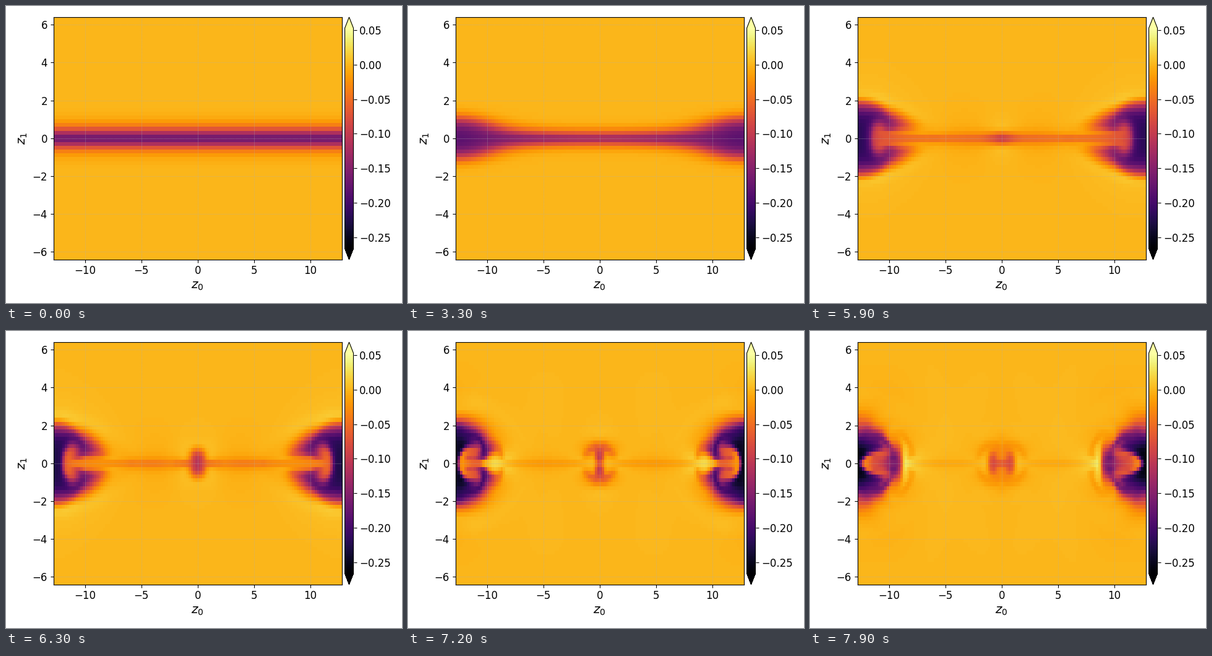
A matplotlib script for the animation above (8 s loop, 640x480 px).

```python
"""Two-fluid magnetic reconnection: ion momentum out of the plane."""
import numpy as np
import matplotlib.pyplot as plt
from matplotlib.animation import FuncAnimation
from mpl_toolkits.axes_grid1 import make_axes_locatable

FRAMES, INTERVAL = 80, 100
LX, LY, NX, NY = 25.6, 12.8, 128, 64
H = LX / NX
DT = 0.9 * H                      # light speed is 1
GAMMA = 5 / 3
B0, LAM, NB, PSI0 = 0.1, 0.5, 0.2, 0.01
MASS = np.array([1 / 25, 1.0]).reshape(2, 1, 1)
CHARGE = np.array([-1.0, 1.0]).reshape(2, 1, 1)
SHARE = np.array([1 / 6, 5 / 6]).reshape(2, 1, 1)
QM = CHARGE / MASS
RHO_MIN, P_MIN = 0.005 * MASS, 1e-6
MARK_FRAME, MARK_VALUE = 51, -0.075   # X-line value that sets the clock
EVERY, MAX_STEPS = 4, 2400


def initial():
    """Perturbed current sheet on one quarter of the box."""
    x = (np.arange(NX // 2) + 0.5) * H
    y = (np.arange(NY // 2) + 0.5)[:, None] * H
    sech2 = 1 / np.cosh(y / LAM) ** 2 + 0 * x
    n = sech2 + NB
    fluid = np.zeros((5, 2) + n.shape)
    fluid[0] = MASS * n
    fluid[3] = -SHARE * B0 / LAM * sech2 / QM
    p = SHARE * n * B0 ** 2 / 2
    fluid[4] = p / (GAMMA - 1) + fluid[3] ** 2 / fluid[0] / 2
    kx, ky = 2 * np.pi / LX, np.pi / LY
    field = np.zeros((7,) + n.shape)      # Ex Ey Ez Bx By Bz psi
    field[3] = B0 * np.tanh(y / LAM) - PSI0 * ky * np.cos(kx * x) * np.sin(ky * y)
    field[4] = PSI0 * kx * np.sin(kx * x) * np.cos(ky * y)
    return fluid, field


def slope(a):
    """Monotonized-centred differences along the last axis."""
    d = np.diff(a)
    l, r = d[..., :-1], d[..., 1:]
    m = np.minimum(2 * np.minimum(abs(l), abs(r)), abs(l + r) / 2)
    return np.where(l * r > 0, np.copysign(m, l), 0)


def kinetic(u):
    return (u[1] ** 2 + u[2] ** 2 + u[3] ** 2) / u[0] / 2


def primitive(u):
    w = u / u[0]
    w[0] = u[0]
    w[4] = (GAMMA - 1) * (u[4] - kinetic(u))
    return w


def hllc(L, R):
    cl, cr = (np.sqrt(GAMMA * w[4] / w[0]) for w in (L, R))
    sl = np.minimum(L[1] - cl, R[1] - cr)
    sr = np.maximum(L[1] + cl, R[1] + cr)
    ml, mr = L[0] * (sl - L[1]), R[0] * (sr - R[1])
    sm = (R[4] - L[4] + ml * L[1] - mr * R[1]) / (ml - mr)
    left = sm > 0
    r, u, v, w, p = np.where(left, L, R)
    s = np.where(left, sl, sr)
    e = p / (GAMMA - 1) + r * (u * u + v * v + w * w) / 2
    k = (s - u) / (s - sm)
    rk = r * k
    state = np.array([r, r * u, r * v, r * w, e])
    star = np.array([rk, rk * sm, rk * v, rk * w,
                     k * (e + (sm - u) * (r * sm + p / (s - u)))])
    flux = u * state
    flux[1] += p
    flux[4] += p * u
    return flux + np.where(left, np.minimum(s, 0), np.maximum(s, 0)) * (star - state)


def sweep_fluid(fluid, axis):
    view = fluid if axis == 0 else fluid.swapaxes(2, 3)
    order = [0, 1, 2, 3, 4] if axis == 0 else [0, 2, 1, 3, 4]
    u = view[order]
    w = primitive(u)
    w = np.concatenate([w[..., 1::-1], w, w[..., :-3:-1]], -1)
    w[1, ..., :2] *= -1
    w[1, ..., -2:] *= -1
    d = slope(w)
    c = w[..., 1:-1]
    change = c[1] * d
    change[0] += c[0] * d[1]
    change[1] += d[4] / c[0]
    change[4] += GAMMA * c[4] * d[1]
    mid = c - DT / H / 2 * change
    L, R = (mid + d / 2)[..., :-1], (mid - d / 2)[..., 1:]
    for side in (L, R):
        np.maximum(side[0], RHO_MIN, out=side[0])
        np.maximum(side[4], P_MIN, out=side[4])
    u -= DT / H * np.diff(hllc(L, R))
    np.maximum(u[0], RHO_MIN, out=u[0])
    u[4] = np.maximum(u[4], kinetic(u) + P_MIN / (GAMMA - 1))
    view[order] = u


def sweep_field(field, axis):
    """Both wave families run round one ring that folds at the borders."""
    if axis == 0:
        view, a, b, end = field, [1, 2, 3], [5, 4, 6], 1
        sign = np.array([1, -1, 1]).reshape(3, 1, 1)
    else:
        view, a, b, end = field.swapaxes(1, 2), [0, 2, 4], [5, 3, 6], -1
        sign = np.array([-1, 1, 1]).reshape(3, 1, 1)
    p, q = view[a], sign * view[b]
    n = p.shape[-1]
    ring = np.concatenate([p + q, end * (p - q)[..., ::-1]], -1)
    wide = np.concatenate([end * ring[..., -2:], ring, end * ring[..., :1]], -1)
    nu = DT / H
    flux = wide[..., 1:-1] + (1 - nu) / 2 * slope(wide)
    ring = ring - nu * np.diff(flux)
    up, down = ring[..., :n], end * ring[..., :n - 1:-1]
    view[a] = (up + down) / 2
    view[b] = sign * (up - down) / 2


def cross(a, b):
    return np.array([a[1] * b[2] - a[2] * b[1],
                     a[2] * b[0] - a[0] * b[2],
                     a[0] * b[1] - a[1] * b[0]])


def dot(a, b):
    return a[0] * b[0] + a[1] * b[1] + a[2] * b[2]


def couple(fluid, field):
    """Time-centred implicit Lorentz force and current."""
    h = DT / 2
    E, B = field[:3], field[3:6]
    b = h * QM * B[:, None]
    norm = 1 + dot(b, b)

    def turn(r):
        return (r + dot(r, b) * b + cross(r, b)) / norm

    J = QM * fluid[1:4]
    w = h * h * QM ** 2 * fluid[0]
    old = kinetic(fluid)
    a = 1 + (w / norm).sum(0)
    beta = (w * (h * QM) ** 2 / norm).sum(0)
    delta = (w * h * QM / norm).sum(0)
    K = E - h * turn(J).sum(1)
    r = (K - beta * B * dot(K, B) / (a + beta * dot(B, B))) / a
    d = delta / a * B
    mid = (r - cross(r, d) + dot(r, d) * d) / (1 + dot(d, d))
    J = 2 * turn(J + w / h * mid[:, None]) - J
    field[:3] = 2 * mid - E
    fluid[1:4] = J / QM
    fluid[4] += kinetic(fluid) - old


def simulate():
    """Ion momentum history and the number of snapshots per frame."""
    fluid, field = initial()
    history, pace = [fluid[3, 1].copy()], None
    for step in range(1, MAX_STEPS + 1):
        couple(fluid, field)
        for axis in ((0, 1) if step % 2 else (1, 0)):
            sweep_fluid(fluid, axis)
            sweep_field(field, axis)
        if step % EVERY:
            continue
        history.append(fluid[3, 1].copy())
        if pace is None and history[-1][0, 0] > MARK_VALUE:
            pace = (len(history) - 1) / MARK_FRAME
        if pace and len(history) > pace * (FRAMES - 1) + 1:
            break
    return history, pace or (len(history) - 2) / (FRAMES - 1)


def unfold(q):
    half = np.concatenate([q[:, ::-1], q], 1)
    return np.concatenate([half[::-1], half], 0)


history, pace = simulate()


def momentum(i):
    t = i * pace
    k = min(int(t), len(history) - 2)
    f = t - k
    return unfold((1 - f) * history[k] + f * history[k + 1])


plt.rcParams.update({"font.size": 12, "axes.labelsize": "large",
                     "grid.linestyle": ":", "grid.linewidth": 0.5})
fig, ax = plt.subplots(figsize=(6.4, 4.8), dpi=100)
mesh = ax.pcolormesh(np.linspace(-LX / 2, LX / 2, NX + 1),
                     np.linspace(-LY / 2, LY / 2, NY + 1),
                     momentum(0), cmap="inferno", vmin=-0.266, vmax=0.0527)
ax.set_xlabel("$z_0$")
ax.set_ylabel("$z_1$")
ax.grid(True)
cax = make_axes_locatable(ax).append_axes("right", size="3%", pad=0.05)
fig.colorbar(mesh, cax=cax, extend="both")
fig.tight_layout()


def draw(i):
    mesh.set_array(momentum(i))
    return [mesh]


anim = FuncAnimation(fig, draw, frames=FRAMES, interval=INTERVAL,
                     repeat=True, repeat_delay=0)
plt.show()
```
